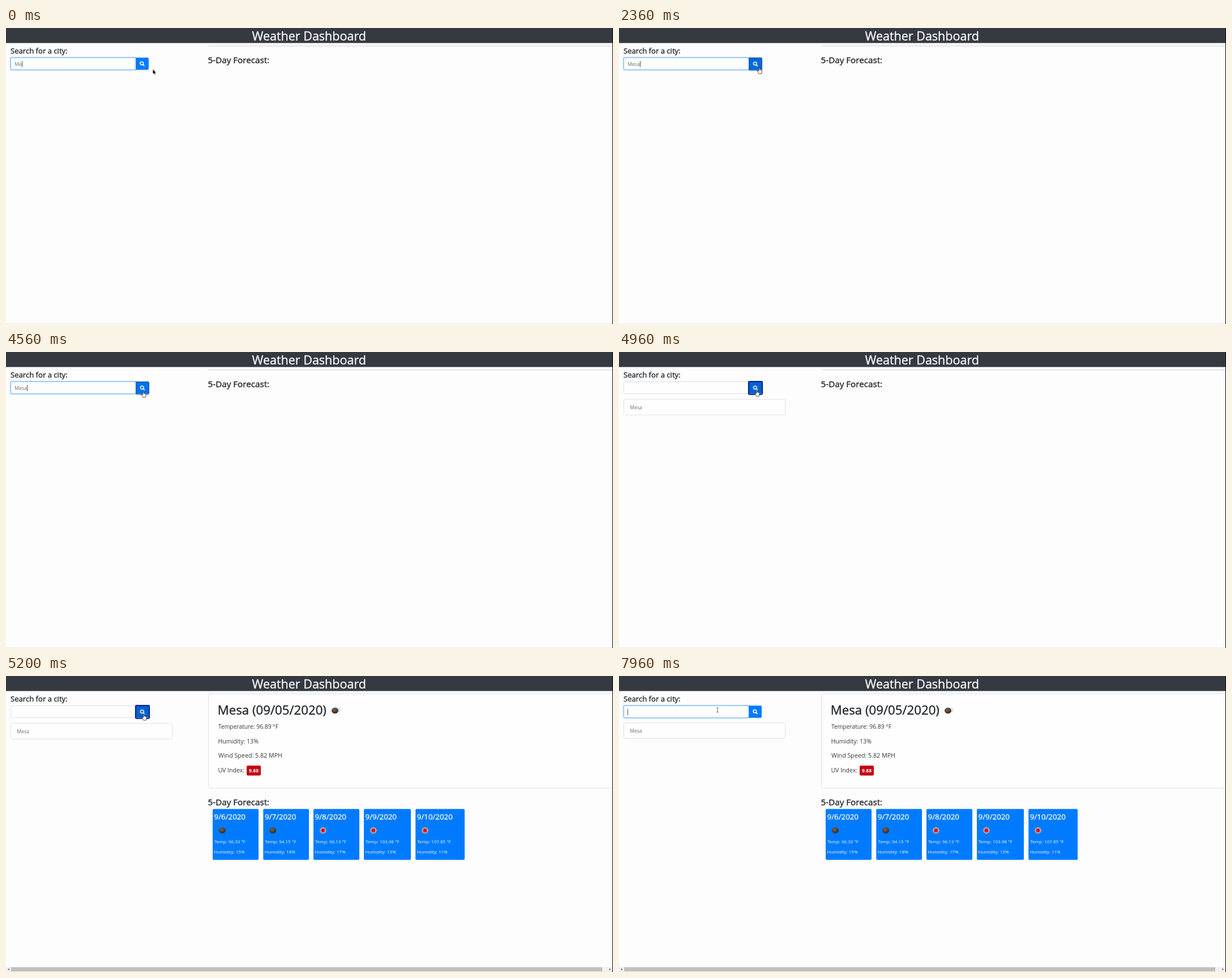
Write an HTML page that moves like this. It is 1072x522 px and loops after 8000 ms.

```html
<!DOCTYPE html>
<html lang="en">
<head>
<meta charset="utf-8">
<title>Weather Dashboard</title>
<style>
html, body { margin: 0; width: 100%; height: 100%; overflow: hidden; background: #fdfdfd; }
svg { display: block; }
text { font-family: "Open Sans", "Noto Sans", sans-serif; fill: #34393e; white-space: pre; }
.head { fill: #212529; stroke: #212529; stroke-width: .35; }
.light { fill: #f8f9fa; stroke: #f8f9fa; }
.field { font-size: 8.6px; fill: #6a7075; }
.day text { fill: #f4f9ff; font-size: 8px; }
.day .head { font-size: 13.3px; stroke: #f4f9ff; }

/* One 8 s clock for everything; the small offset keeps cuts clear of whole steps. */
.a { animation: 8s step-end -4ms infinite; }

#s { animation-name: typeS; }
#a { animation-name: typeA; }
#me { animation-name: typeMe; }
@keyframes typeS { 0% { visibility: hidden } 10%, 60.4% { visibility: visible } 60.5%, 100% { visibility: hidden } }
@keyframes typeA { 0% { visibility: hidden } 11.5%, 60.4% { visibility: visible } 60.5%, 100% { visibility: hidden } }
@keyframes typeMe { 0% { visibility: visible } 60.5%, 100% { visibility: hidden } }

#caret { animation-name: caretX, blink; }
@keyframes caretX {
  0% { transform: translateX(28px) } 10% { transform: translateX(32px) }
  11.5% { transform: translateX(37px) } 60.5%, 100% { transform: translateX(15px) }
}
@keyframes blink {
  0%, 10%, 24.5%, 38%, 51.5%, 96.5%, 100% { visibility: visible }
  7%, 18%, 31%, 44.5%, 58% { visibility: hidden }
}

#focus { animation-name: focus; animation-timing-function: linear; }
@keyframes focus { 0%, 59.5% { opacity: 1 } 61%, 96.5% { opacity: 0 } 98.5%, 100% { opacity: 1 } }

#face { animation-name: face; animation-timing-function: linear; }
@keyframes face {
  0%, 26.5% { fill: #007bff } 28.5%, 35.5% { fill: #0069d9 } 37.5%, 56% { fill: #007bff }
  58%, 59.5% { fill: #0069d9 } 61%, 96.5% { fill: #0062cc } 98.5%, 100% { fill: #007bff }
}
#hover { animation-name: hover; }
@keyframes hover {
  0%, 35.5%, 76.5%, 100% { visibility: hidden } 26.5%, 56% { visibility: visible }
}
#glass { animation-name: glass; }
@keyframes glass {
  0%, 35.5%, 76.5%, 100% { transform: none } 26.5%, 56% { transform: translate(.5px, .5px) }
}
#press { animation-name: press; }
@keyframes press { 0%, 76.5%, 100% { visibility: hidden } 59.5% { visibility: visible } }
#ring { animation-name: ring; }
@keyframes ring { 0%, 97%, 100% { visibility: hidden } 76.5% { visibility: visible } }

#list { animation-name: list; }
@keyframes list {
  0% { visibility: hidden; transform: none } 60.5% { visibility: visible; transform: none }
  76.5%, 100% { visibility: visible; transform: translateY(-1px) }
}
#card { animation-name: card; }
@keyframes card { 0% { height: .6px } 63% { height: 139px } 64.5%, 100% { height: 166.5px } }
#title { animation-name: title; }
@keyframes title {
  0% { transform: none } 63% { transform: translateY(139px) } 64.5%, 100% { transform: translateY(166px) }
}
#now, #bar { animation-name: now; }
@keyframes now { 0% { visibility: hidden } 63%, 100% { visibility: visible } }
#uv { animation-name: uv; }
@keyframes uv { 0% { visibility: hidden } 64.5%, 100% { visibility: visible } }
#days { animation-name: days; }
@keyframes days { 0% { visibility: hidden } 65%, 100% { visibility: visible } }

#pointer { animation-name: move; animation-timing-function: ease-in-out; }
@keyframes move {
  0%, 24.5% { transform: translate(259.5px, 73px) }
  32.5%, 34.5% { transform: translate(243px, 68px) }
  36.5% { transform: translate(268.2px, 67.5px) }
  39%, 54% { transform: translate(271px, 69px) }
  57% { transform: translate(242.5px, 68.7px) }
  58.5%, 76% { transform: translate(243.5px, 66.8px) }
  84.5%, 93% { transform: translate(168.5px, 73px) }
  96%, 100% { transform: translate(174px, 60px) }
}
#arrow { animation-name: arrow; }
@keyframes arrow {
  0%, 24.5%, 35.5% { visibility: visible } 10%, 26.5%, 56%, 100% { visibility: hidden }
}
#hand { animation-name: hover; }
#beam { animation-name: beam; }
@keyframes beam { 0% { visibility: hidden } 76.5%, 100% { visibility: visible } }
</style>
</head>
<body>
<svg width="1072" height="522" viewBox="0 0 1072 522">
  <defs>
    <radialGradient id="brown" cx=".4" cy=".35" r=".7">
      <stop offset="0" stop-color="#7d6350"/><stop offset=".55" stop-color="#54402f"/><stop offset="1" stop-color="#30231b"/>
    </radialGradient>
    <g id="moon"><ellipse rx="6" ry="5.2" fill="url(#brown)"/></g>
    <g id="sun">
      <circle r="4.9" fill="none" stroke="#f3b183" stroke-width="2.2" stroke-dasharray="1.5 1.065"/>
      <circle r="4" fill="#f6c79c"/><circle r="3.4" fill="#d90f1c"/>
    </g>
  </defs>

  <rect width="1072" height="522" fill="#fdfdfd"/>
  <rect y="521" width="1072" height="1" fill="#e9e9e9"/>
  <rect width="1072" height="26.5" fill="#343a40"/>
  <text class="head light" x="434.5" y="22" font-size="21.5">Weather Dashboard</text>

  <text class="head" x="8" y="44.6" font-size="13.1">Search for a city:</text>
  <rect x="8.5" y="52.5" width="221" height="21" rx="2" fill="#fefefe" stroke="#dcdfe6"/>
  <g id="focus" class="a" fill="none">
    <rect x="7.8" y="51.8" width="222.4" height="22.4" rx="2.5" stroke="#007bff" stroke-opacity=".25" stroke-width="2.2"/>
    <rect x="8.5" y="52.5" width="221" height="21" rx="2" stroke="#80bdff"/>
  </g>
  <text class="field" x="15.2" y="66.7"><tspan id="me" class="a">Me</tspan><tspan id="s" class="a">s</tspan><tspan id="a" class="a">a</tspan></text>
  <rect id="caret" class="a" y="58" width="1" height="11" fill="#495057"/>

  <path id="face" class="a" d="M229 52.3h21q2 0 2 2v17.4q0 2-2 2h-21z"/>
  <rect id="hover" class="a" x="229.5" y="52.5" width="23" height="22" rx="1.5" fill="none" stroke="#24507f"/>
  <rect id="press" class="a" x="228.8" y="51.8" width="24.4" height="23" rx="1.5" fill="none" stroke="#0818a0" stroke-width="1.8"/>
  <rect id="ring" class="a" x="228.6" y="51.8" width="23.9" height="22.2" rx="1.5" fill="none" stroke="#7590ab" stroke-width="1.6"/>
  <g id="glass" class="a" fill="none" stroke="#fff" stroke-width="1.5">
    <circle cx="239.8" cy="62.2" r="2.8"/><path d="M241.8 64.2l2.6 2.6" stroke-width="1.9"/>
  </g>

  <g id="list" class="a">
    <rect x="8.5" y="83.5" width="285" height="27.5" rx="2" fill="#fefefe" stroke="#e1e2ea"/>
    <text class="field" x="19.3" y="101">Mesa</text>
  </g>

  <rect id="card" class="a" x="357.5" y="31.3" width="800" rx="2" fill="#fefefe" stroke="#dfdfea"/>
  <g id="now" class="a">
    <text class="head" x="373.8" y="67.6" font-size="22.2">Mesa (09/05/2020)</text>
    <use href="#moon" x="581" y="61"/>
    <path d="M587.3 57h1.3M589 60h1.2M587.6 63h1" stroke="#54402f" stroke-width="1.2"/>
    <text x="375" y="93" font-size="10.3">Temperature: 96.89 °F</text>
    <text x="374.4" y="118.6" font-size="10.6">Humidity: 13%</text>
    <text x="375" y="144.2" font-size="10.7">Wind Speed: 5.82 MPH</text>
  </g>
  <g id="uv" class="a">
    <text x="374.4" y="170" font-size="10.6">UV Index:</text>
    <rect x="425" y="158" width="25" height="17.5" rx="2.2" fill="#c40012"/>
    <text x="429" y="169.8" font-size="8.5" font-weight="700" style="fill:#fff">9.88</text>
  </g>
  <text id="title" class="head a" x="356.6" y="61.5" font-size="15.2">5-Day Forecast:</text>
  <g id="days" class="a"></g>

  <g id="bar" class="a">
    <rect y="513" width="1072" height="8.5" fill="#f1f1f1"/>
    <rect x="9" y="513.6" width="1044" height="7.2" fill="#bfbfc0"/>
    <path d="M5.5 515.2v4l-2.2-2zM1065.5 515.2v4l2.2-2z" fill="#555"/>
  </g>
  <rect x="1071" width="1" height="522" fill="#08090a"/>

  <g id="pointer" class="a">
    <path id="arrow" class="a" d="M0 0v7.8l1.8-1.6 1.3 2.7 1.3-.6-1.2-2.6h2.2z" fill="#0a0a0a"/>
    <path id="hand" class="a" d="M-.9 1q0-1 .9-1t.9 1v3l3 .7q1 .4.9 1.5l-.5 3-.6 2h-4.4l-1-2-2-2.4q-.4-1.2.8-1.1l2 1z" fill="#fff" stroke="#151515" stroke-width=".8"/>
    <path id="beam" class="a" d="M-1.5-4h3M0-4v8M-1.5 4h3" fill="none" stroke="#555" stroke-width=".9"/>
  </g>
</svg>
<script>
// [left, width, icon, date, temperature, humidity]
const days = [
  [365, 81, 'moon', '9/6/2020', '96.33', 15],
  [454.3, 80.7, 'moon', '9/7/2020', '94.15', 18],
  [543, 81, 'sun', '9/8/2020', '96.13', 17],
  [632, 83, 'sun', '9/9/2020', '103.98', 13],
  [723.2, 86.8, 'sun', '9/10/2020', '107.85', 11],
];
document.getElementById('days').innerHTML = days.map(([x, w, icon, date, temp, hum]) => `
  <g class="day" transform="translate(${x} 234.5)">
    <rect width="${w}" height="89.7" rx="2" fill="#007bff"/>
    <text class="head" x="2.6" y="18">${date}</text>
    <use href="#${icon}" x="16.8" y="37.8"/>
    <text x="3" y="60.3">Temp: ${temp} °F</text>
    <text x="2.5" y="78.3">Humidity: ${hum}%</text>
  </g>`).join('');
</script>
</body>
</html>
```
